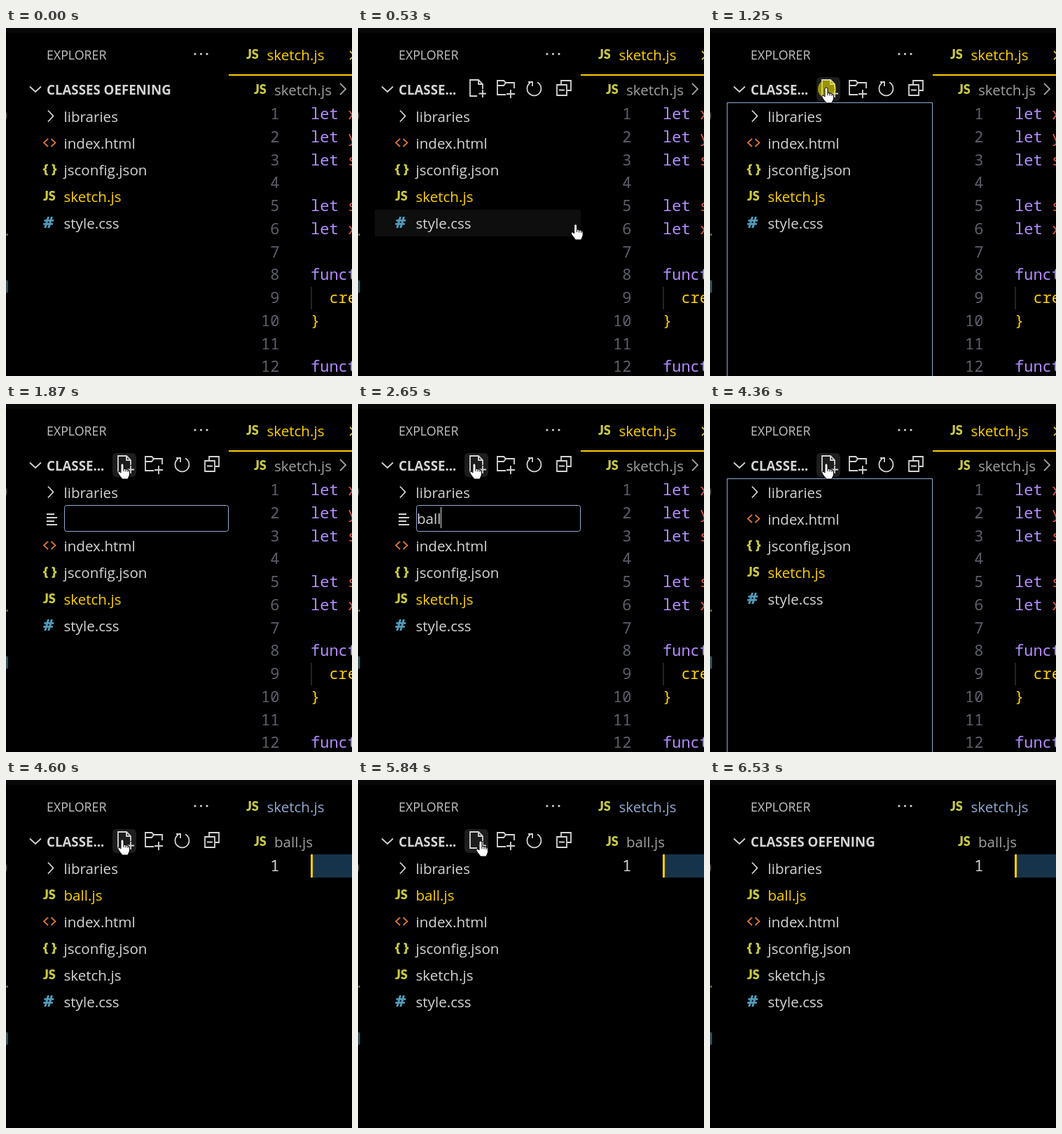
These frames come from a looping animation (494x496 px, 6760 ms). An HTML page with a canvas:

```html
<!DOCTYPE html>
<html>
<head>
<meta charset="utf-8">
<style>
  html, body { margin: 0; width: 100%; height: 100%; overflow: hidden; background: #000; }
  canvas { display: block; }
</style>
</head>
<body>
<canvas width="494" height="496"></canvas>
<script>
const ctx = document.querySelector('canvas').getContext('2d');
const LOOP = 6760, ROW = 38, LINE = 32.75, SIDE = 318;
const UI = '500 20.6px "Open Sans", sans-serif';
const CODE = '500 22px "Noto Sans Mono", monospace';
const GOLD = '#ffd000', GREY = '#d4d4d4', FOCUS = '#94a9d3', PURPLE = '#b48cff', RED = '#e4575c';
const between = (t, a, b) => t >= a && t < b;

// Draws a string and returns the x where it ends.
function text(str, x, y, color = GREY, font = UI) {
  ctx.font = font;
  ctx.fillStyle = color;
  ctx.fillText(str, x, y);
  return x + ctx.measureText(str).width;
}

function box(x, y, w, h, color, r = 0) {
  ctx.beginPath();
  ctx.roundRect(x, y, w, h, r);
  ctx.fillStyle = color;
  ctx.fill();
}

function frame(x, y, w, h, color, r = 0) {
  ctx.beginPath();
  ctx.roundRect(x + .5, y + .5, w - 1, h - 1, r);
  ctx.strokeStyle = color;
  ctx.lineWidth = 1;
  ctx.stroke();
}

function stroke(d, color = GREY, width = 1.8) {
  ctx.strokeStyle = color;
  ctx.lineWidth = width;
  ctx.stroke(new Path2D(d));
}

// File icons, centred on y.
const icons = {
  dir: y => stroke(`M60 ${y - 8.5}l7.5 8l-7.5 8`),
  js: (y, x = 53) => text('JS', x, y + 5.5, '#cbcb41', '900 18px Lato, sans-serif'),
  html: y => stroke(`M60 ${y - 6}l-6 5.5l6 5.5M64.500 ${y - 6}l6 5.5l-6 5.5`, '#d9762f', 1.8),
  json: y => text('{ }', 52.5, y + 5, '#cbcb41', '800 18px "Open Sans", sans-serif'),
  css: y => text('#', 53, y + 7, '#519aba', 'italic 800 23px "Open Sans", sans-serif'),
  txt: y => stroke(`M58 ${y - 7}h11m-11 5h15m-15 5h11m-11 5h15`, '#d4d7d6', 2)
};

const files = [['libraries', 'dir'], ['index.html', 'html'], ['jsconfig.json', 'json'],
  ['sketch.js', 'js'], ['style.css', 'css']];

const typing = [[2250, 'b'], [2400, 'ba'], [2480, 'bal'], [2650, 'ball'],
  [2800, 'ball.'], [3030, 'ball.j'], [3260, 'ball.js']];

function pointer(t) {
  if (t < 230 || t >= 6380) return null;
  if (t < 930) {
    const p = Math.min(8, Math.floor((t - 230) / 77.5)) / 8, e = p * (1.5 - p / 2);
    return [412 - 206 * e, 464 - 374 * e];
  }
  if (t < 1000) return [184, 87];
  if (t < 5770) return [166, 85];
  if (t < 5840) return [170, 86];
  const e = (Math.floor((t - 5770) / 76 - .92 + 1e-6) / 7) ** 1.2;
  return [175 + 355 * e, 87 + 470 * e];
}

function drawPointer([x, y]) {
  ctx.save();
  ctx.translate(x, y);
  if (x < SIDE) {
    const hand = 'M-2 1Q0-1.500 2 1V7L8 8.500Q10.500 9 10.500 12V16L8 22H0L-6 14Q-7 10.500-4 11L-2 13Z';
    ctx.fillStyle = '#fff';
    ctx.fill(new Path2D(hand));
    stroke(hand + 'M2 7V11M5 8V11.500M8 9V12', '#000', 1);
  } else {
    stroke('M-4-10h3l1 1l1-1h3M0-9V9M-4 10h3l1-1l1 1h3', '#fff', 1.5);
  }
  ctx.restore();
}

function drawToolbar([x, y]) {
  const spots = [169, 211, 252, 293];
  const hot = y < 105 && spots.find(s => Math.abs(x - s) < 18);
  if (hot) box(hot - 17, 70, 34, 34, '#1d1d1d', 6);
  stroke('M170 97H160V74H172L178 80V87M172 74V80H178M178 88V99M172.500 93.500H183');
  stroke('M211 95H199V75H208L211 78H223V86M199 82H208L211 78M218 88V100M212 94H224');
  stroke('M246 78A10 10 0 1 0 256 77.500M243 77H249V83');
  stroke('M290 80V75H304V89H299M284 81H298V96H284ZM287 88.500H295');
}

function drawInput(t, y) {
  const value = typing.reduce((v, [at, s]) => t >= at ? s : v, '');
  const invalid = value === 'ball.';
  if (value === 'ball.js') icons.js(y); else icons.txt(y);
  frame(83, 144, 235, 38, invalid ? '#be1100' : FOCUS, 3);
  const end = text(value, 84, 171);
  if (!between(t, 1870, 2250) && t < 3810) box(Math.round(end), 147, 1, 30, '#ddd');
  return invalid;
}

function drawError() {
  box(83, 181, 235, 135, '#5a1d1d');
  frame(83, 181, 235, 135, '#be1100');
  let x = text('The name ', 90, 207);
  x = text('ball.', x, 207, GREY, UI.replace('500', '700'));
  text(' is not', x, 207);
  ['valid as a file or folder', 'name. Please choose a', 'different name.']
    .forEach((s, i) => text(s, 90, 237 + 30 * i));
}

function drawSidebar(t, mouse) {
  const over = mouse && mouse[0] < SIDE;
  const naming = between(t, 1320, 4290), created = t >= 4530;
  const active = t >= 4600 ? 'ball.js' : 'sketch.js';
  const rows = files.slice();
  if (naming) rows.splice(1, 0, ['', 'input']);
  if (created) rows.splice(1, 0, ['ball.js', 'js']);

  text('EXPLORER', 58, 45, '#c4c4c4', '500 17.8px "Open Sans", sans-serif');
  [270, 278.5, 287].forEach(x => box(x - 1.6, 35.4, 3.2, 3.2, GREY, 2));
  stroke('M34 83.500l8 7.500l8-7.500');
  text(over ? 'CLASSE...' : 'CLASSES OEFENING', 58, 95, GREY, '700 18.7px "Open Sans", sans-serif');
  if (over) drawToolbar(mouse);

  const hot = over ? Math.floor((mouse[1] - 107) / ROW) : -1;
  if (hot >= 0 && hot < rows.length) box(24, 107 + hot * ROW, SIDE - 24, ROW, '#0e0e0e');

  let invalid = false;
  rows.forEach(([name, icon], i) => {
    const y = 126 + i * ROW;
    if (icon === 'input') {
      invalid = drawInput(t, y);
      return;
    }
    icons[icon](y);
    text(name, 82.5, y + 8, name === active ? GOLD : GREY);
  });
  if (invalid) drawError();
  if (between(t, 1250, 1320) || between(t, 4290, 4530)) frame(24, 106, 294, 400, FOCUS);
}

function drawCode(line, y) {
  const [word, name, color = PURPLE] = line;
  text(word, 435, y, color, CODE);
  if (name) text(name, 488, y, RED, CODE);
}

const code = [['let', 'x'], ['let', 'y'], ['let', 's'], [''], ['let', 's'], ['let', 'x'], [''],
  ['function'], ['  createCanvas', '', GOLD], ['}', '', GOLD], [''], ['function']];

function drawEditor(t) {
  const opened = t >= 4600;
  icons.js(38, 343);
  text('sketch.js', 372.5, 46, opened ? '#8fa8cf' : GOLD);
  icons.js(88, 354);
  text(opened ? 'ball.js' : 'sketch.js', 383, 96, '#a0a0a0');
  ctx.textAlign = 'right';
  (opened ? [0] : code).forEach((_, i) =>
    text(i + 1, 390.5, 130 + i * LINE, opened ? GREY : '#5d606c', CODE));
  ctx.textAlign = 'left';

  if (opened) {
    box(435, 106, 59, 33, '#15344b');
    if (!between(t, 5080, 5540) && !between(t, 6070, 6530)) box(435, 106, 3, 33, GOLD);
    return;
  }
  box(SIDE, 66, 176, 2, GOLD);
  stroke('M491 33l6 6l-6 6', '#e6c020');
  stroke('M477 79l8 8l-8 8', '#a0a0a0');
  box(435, 369, 2, 32, '#242424');
  code.forEach((line, i) => drawCode(line, 130 + i * LINE));
}

function draw(now) {
  const t = now % LOOP, mouse = pointer(t);
  box(0, 0, 494, 496, '#000');
  box(0, 0, 494, 7, '#080808');
  // Slivers of the activity bar
  stroke('M-2 117Q3 125-2 133', '#555', 2);
  box(0, 293, 3, 3, '#555');
  box(-5, 359, 8, 19, '#35504f', 3);

  drawEditor(t);
  drawSidebar(t, mouse);
  if (between(t, 1250, 1320)) {
    box(154, 74, 26, 26, 'rgba(235, 225, 0, .6)', 13);
  }
  if (mouse) drawPointer(mouse);
  requestAnimationFrame(draw);
}
requestAnimationFrame(draw);
</script>
</body>
</html>
```
